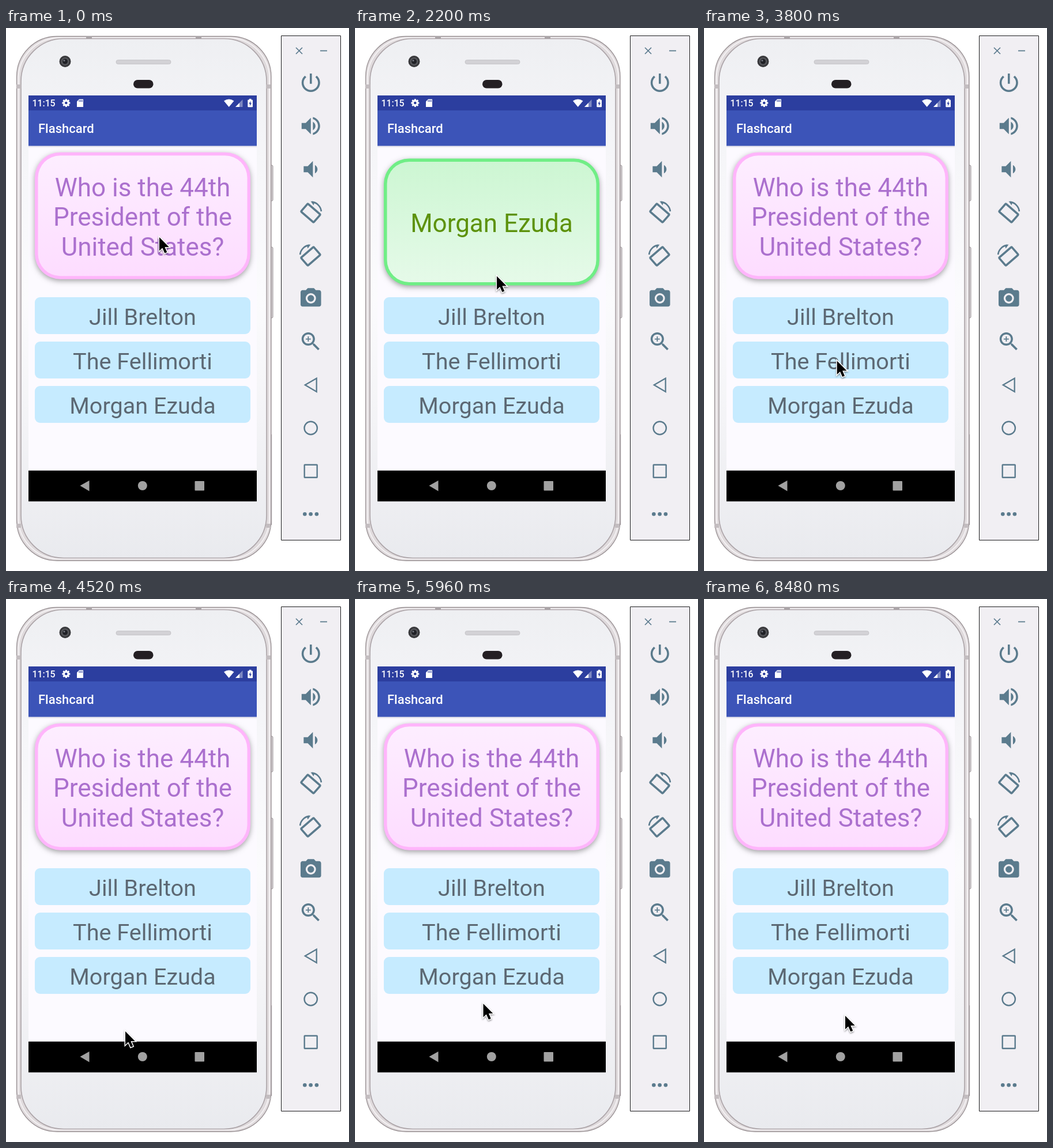
These frames come from a looping animation (595 by 942 pixels, 8520 ms). An HTML page with a canvas:

```html
<!DOCTYPE html>
<html lang="en">
<head>
<meta charset="utf-8">
<title>Flashcard</title>
<style>
html, body { margin: 0; width: 100%; height: 100%; overflow: hidden; background: #fff; }
canvas { display: block; width: 595px; height: 942px; }
</style>
</head>
<body>
<canvas id="stage"></canvas>
<script>
const W = 595, H = 942, LOOP = 8520, STEP = 40;
const FLIP = 1720, FLIP_BACK = 2680, MINUTE = 7200;
const FONT = 'Roboto, "Noto Sans", sans-serif';
const TOOL = '#5b7b8d';
const ANSWER = 'Morgan Ezuda';
const OPTIONS = ['Jill Brelton', 'The Fellimorti', ANSWER];
const QUESTION = ['Who is the 44th', 'President of the', 'United States?'];

// time, x, y of the pointer tip
const POINTER = [
  [0, 266, 363], [1160, 321, 334], [2200, 246, 430.5], [3080, 254.5, 405],
  [4520, 207, 750], [5960, 222.5, 702], [7900, 245, 723], [LOOP, 245, 723]
];

// 24-unit icons
const ICONS = {
  power: 'M13 3h-2v10h2V3zm4.83 2.17l-1.42 1.42C17.99 7.86 19 9.81 19 12c0 3.87-3.13 7-7 7s-7-3.13-7-7c0-2.19 1.01-4.14 2.58-5.42L6.17 5.17C4.23 6.82 3 9.26 3 12c0 4.97 4.03 9 9 9s9-4.03 9-9c0-2.74-1.23-5.18-3.17-6.83z',
  louder: 'M3 9v6h4l5 5V4L7 9H3zm13.5 3c0-1.77-1.02-3.29-2.5-4.03v8.05c1.48-.73 2.5-2.25 2.5-4.02zM14 3.23v2.06c2.89.86 5 3.54 5 6.71s-2.11 5.85-5 6.71v2.06c4.01-.91 7-4.49 7-8.77s-2.99-7.86-7-8.77z',
  quieter: 'M18.5 12c0-1.77-1.02-3.29-2.5-4.03v8.05c1.48-.73 2.5-2.25 2.5-4.02zM5 9v6h4l5 5V4L9 9H5z',
  camera: 'M9 2 7.17 4H4c-1.1 0-2 .9-2 2v12c0 1.1.9 2 2 2h16c1.1 0 2-.9 2-2V6c0-1.1-.9-2-2-2h-3.17L15 2H9z',
  zoom: 'M15.5 14h-.79l-.28-.27C15.41 12.59 16 11.11 16 9.5 16 5.91 13.09 3 9.5 3S3 5.91 3 9.5 5.91 16 9.5 16c1.61 0 3.09-.59 4.23-1.57l.27.28v.79l5 4.99L20.49 19l-4.99-5zm-6 0C7.01 14 5 11.99 5 9.5S7.01 5 9.5 5 14 7.01 14 9.5 11.99 14 9.5 14zm2.5-4h-2v2H9v-2H7V9h2V7h1v2h2v1z'
};

const canvas = document.getElementById('stage');
const ctx = canvas.getContext('2d');
const dpr = window.devicePixelRatio || 1;
canvas.width = W * dpr;
canvas.height = H * dpr;

function paint(fill, stroke, width) {
  if (fill) { ctx.fillStyle = fill; ctx.fill(); }
  if (stroke) { ctx.strokeStyle = stroke; ctx.lineWidth = width || 1; ctx.stroke(); }
}

function box(x, y, w, h, r, fill, stroke, width) {
  ctx.beginPath();
  ctx.roundRect(x, y, w, h, r);
  paint(fill, stroke, width);
}

function dot(x, y, r, fill, stroke, width) {
  ctx.beginPath();
  ctx.arc(x, y, r, 0, Math.PI * 2);
  paint(fill, stroke, width);
}

function poly(points, fill, stroke, width, open) {
  ctx.beginPath();
  points.forEach(([x, y]) => ctx.lineTo(x, y));
  if (!open) ctx.closePath();
  paint(fill, stroke, width);
}

function text(str, x, y, size, color, weight = 400, align = 'center') {
  ctx.font = `${weight} ${size}px ${FONT}`;
  ctx.textAlign = align;
  ctx.fillStyle = color;
  ctx.fillText(str, x, y);
}

function fade(y0, y1, ...colors) {
  const g = ctx.createLinearGradient(0, y0, 0, y1);
  colors.forEach((c, i) => g.addColorStop(i / (colors.length - 1), c));
  return g;
}

function shadow(color, blur, dy) {
  ctx.shadowColor = color;
  ctx.shadowBlur = blur * dpr;
  ctx.shadowOffsetY = dy * dpr;
}

function icon(name, x, y) {
  ctx.save();
  ctx.translate(x, y);
  ctx.scale(1.78, 1.78);
  ctx.translate(-12, -12);
  ctx.fillStyle = TOOL;
  ctx.fill(new Path2D(ICONS[name]));
  ctx.restore();
}

function phone() {
  // side keys
  box(457, 238, 6, 62, 2, '#d6d1d4', '#9b9497');
  box(457, 380, 6, 123, 2, '#d6d1d4', '#9b9497');
  // metal rim and face
  box(18.5, 14.5, 441.5, 909.5, 70, '#dfdadc', '#989093', 1.3);
  box(21.5, 17, 435.5, 904, 71, null, '#f4f1f3', 2);
  box(26, 18.5, 426, 901, 74, fade(14, 924, '#eeeff2', '#f6f6f9', '#fbfbfd', '#f3f3f6', '#e9eaee'), '#aba3a7', 1.6);
  poly([[460.5, 705], [460.5, 862]], null, '#a49da0', 1.4, true);
  // antenna bands
  for (const y of [98, 860]) {
    box(18, y, 8, 7, 0, '#c3bdc0');
    box(451, y, 8, 7, 0, '#c3bdc0');
  }
  box(139, 14, 10, 4, 0, '#aaa4a7');
  box(329, 14, 10, 4, 0, '#aaa4a7');
  // camera, speaker, sensor
  dot(102.5, 58, 10, '#38383b');
  dot(102.5, 58, 7, '#55565a');
  dot(102.5, 58, 4.5, '#202126');
  dot(101, 56.5, 1.5, '#747780');
  box(191, 55.5, 95, 7, 3.5, '#d3d2d6', '#c5c4c8');
  box(221, 90, 34.5, 14.5, 7.2, '#241f23');
}

function gear(x, y) {
  ctx.save();
  ctx.translate(x, y);
  dot(0, 0, 3.8, null, '#fff', 3);
  for (let i = 0; i < 8; i++) {
    box(-1.5, -7, 3, 3, 0.5, '#fff');
    ctx.rotate(Math.PI / 4);
  }
  ctx.restore();
}

function statusBar(clock) {
  box(39, 117, 396, 26, 0, '#2c3e9f');
  text(clock, 45.5, 136, 15.8, '#fff', 500, 'left');
  gear(104.3, 130);
  poly([[127, 123.5], [134, 123.5], [134, 137], [123, 137], [123, 127.5]], '#fff');
  for (const x of [126.5, 129, 131.5]) box(x, 125, 1.2, 3, 0, '#2c3e9f');
  ctx.beginPath();
  ctx.moveTo(386.7, 137);
  ctx.lineTo(378, 126.5);
  ctx.quadraticCurveTo(386.7, 120.5, 395.5, 126.5);
  ctx.closePath();
  paint('#fff');
  poly([[398, 137], [410.5, 137], [410.5, 124]], '#7d88c2');
  poly([[398, 137], [405, 137], [405, 130]], '#fff');
  box(419.3, 124.5, 8.7, 12.7, 1, '#fff');
  box(421.8, 122.8, 3.7, 3, 0, '#fff');
  poly([[424.5, 126.5], [421.3, 131.5], [423.2, 131.5], [422.8, 135.5], [426, 130.2], [424.2, 130.2]], '#2c3e9f');
}

function card(y, edge, top, bottom) {
  ctx.save();
  shadow('rgba(0,0,0,0.36)', 10, 3);
  box(50, y, 374, 220, 44, edge);
  ctx.restore();
  box(55.5, y + 5.5, 363, 209, 38.5, fade(y, y + 220, top, bottom));
}

function screen(t) {
  box(39, 205, 396, 563, 0, '#fcfaff');
  box(39, 204.5, 396, 3.5, 0, fade(204.5, 208, '#dedde4', '#fcfaff'));
  box(39, 143, 396, 61.5, 0, '#3c54b8');
  statusBar(t < MINUTE ? '11:15' : '11:16');
  text('Flashcard', 56, 182.4, 22, '#fff', 500, 'left');

  if (t >= FLIP && t < FLIP_BACK) {
    card(226.5, '#70ee86', '#ccf6d2', '#e6fae9');
    text(ANSWER, 237, 354, 44, '#5d920c');
  } else {
    card(215.7, '#ffb5fb', '#fdeeff', '#fddcff');
    QUESTION.forEach((line, i) => text(line, 237, 291.8 + i * 51.5, 44, '#ab70ce'));
  }
  OPTIONS.forEach((name, i) => {
    box(50, 467 + i * 77, 374, 64, 9, '#c6ebff');
    text(name, 237, 515 + i * 77, 39.6, '#5c6873');
  });

  box(39, 767.7, 396, 53.5, 0, '#000');
  poly([[128.5, 794], [144.5, 785], [144.5, 803.5]], '#a1a1a1');
  dot(236.8, 794, 8, '#a1a1a1');
  box(327.5, 786, 16.5, 16.5, 1, '#a1a1a1');
}

// tilted device with a curved arrow; side is 1 or -1
function turn(y, side) {
  ctx.save();
  ctx.translate(528.5, y);
  ctx.scale(side, 1);
  ctx.save();
  ctx.translate(0, 1);
  ctx.rotate(Math.PI / 4.4);
  box(-14.5, -9, 29, 18, 1.5, null, TOOL, 3.6);
  ctx.restore();
  ctx.beginPath();
  ctx.arc(0, 0, 18.5, -1.45, -0.1);
  paint(null, TOOL, 2.6);
  poly([[0, -19.5], [7, -18.3], [5, -12.5]], TOOL);
  ctx.restore();
}

function toolbar() {
  box(477.5, 13.5, 103, 875, 0, '#f1eff3', '#1c1c1e', 1);
  poly([[503, 34], [514, 45]], null, TOOL, 1.7, true);
  poly([[514, 34], [503, 45]], null, TOOL, 1.7, true);
  poly([[545, 39.5], [557, 39.5]], null, TOOL, 1.8, true);
  icon('power', 528.8, 95);
  icon('louder', 528.8, 170);
  icon('quieter', 528.8, 245);
  turn(320, 1);
  turn(395, -1);
  icon('camera', 528.8, 469);
  dot(528.8, 469, 8.9, '#f1eff3');
  dot(528.8, 469, 5.7, TOOL);
  icon('zoom', 528.8, 544);
  poly([[518.8, 619.3], [538.7, 607.7], [538.7, 630.9]], null, TOOL, 2.3);
  dot(528.7, 694, 11.2, null, TOOL, 2.4);
  box(517.7, 757.7, 22, 22, 0.5, null, TOOL, 2.4);
  for (const x of [518.3, 528.6, 538.9]) dot(x, 843.3, 3.3, TOOL);
}

function pointerAt(t) {
  const i = POINTER.findIndex(k => k[0] > t);
  const [t0, x0, y0] = POINTER[i - 1], [t1, x1, y1] = POINTER[i];
  const u = (t - t0) / (t1 - t0), e = u * u * (3 - 2 * u);
  return [x0 + (x1 - x0) * e, y0 + (y1 - y0) * e];
}

function pointer(x, y) {
  const arrow = [[0, 0], [0, 23.5], [5.3, 18.4], [9.3, 27.6], [13.3, 25.9], [9.4, 16.9], [16.8, 16.9]];
  ctx.save();
  ctx.translate(x, y);
  ctx.save();
  shadow('rgba(0,0,0,0.35)', 3, 1.5);
  poly(arrow, '#fff', '#fff', 3);
  ctx.restore();
  poly(arrow, '#000');
  ctx.restore();
}

function draw(now) {
  const t = Math.floor((now % LOOP) / STEP) * STEP;
  ctx.setTransform(dpr, 0, 0, dpr, 0, 0);
  box(0, 0, W, H, 0, '#fff');
  phone();
  screen(t);
  toolbar();
  pointer(...pointerAt(t));
}

let start;
function tick(now) {
  if (start === undefined) start = now;
  draw(Math.max(0, now - start));
  requestAnimationFrame(tick);
}
requestAnimationFrame(tick);
</script>
</body>
</html>
```
